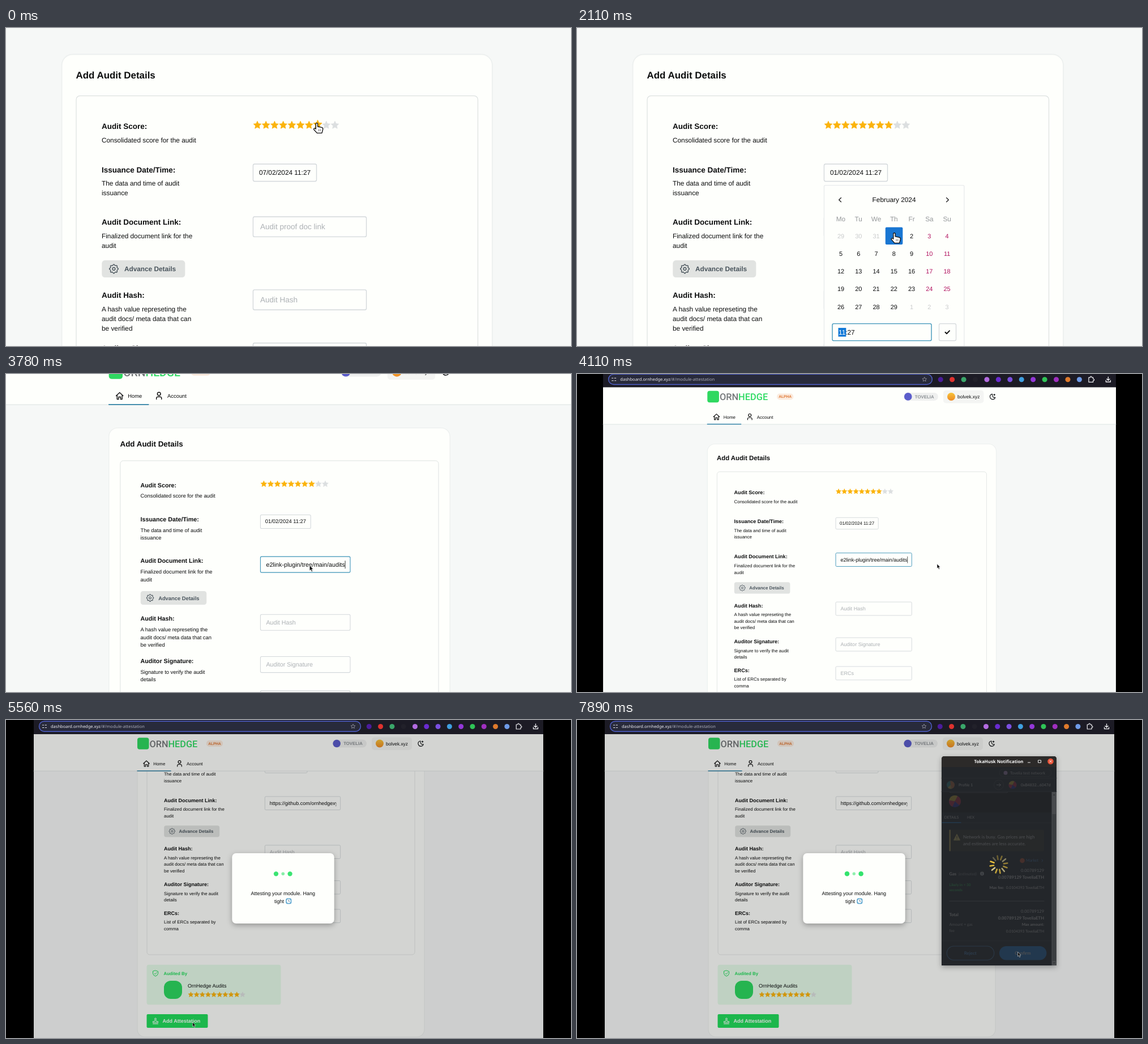
These frames come from a looping animation (998x561 px, 8 s). An HTML page:

```html
<!DOCTYPE html>
<html lang="en">
<head>
<meta charset="utf-8">
<title>Add Audit Details</title>
<style>
html, body { margin: 0; width: 100%; height: 100%; overflow: hidden; background: #000; }
svg { display: block; width: 100%; height: 100%; font-family: "Liberation Sans", Arial, sans-serif; text-rendering: geometricPrecision; }
text { white-space: pre; }
.lato { font-family: Lato, sans-serif; }
.noto { font-family: "Noto Sans", sans-serif; }
.brand { font-family: Roboto, sans-serif; }
.lift { filter: drop-shadow(0 3px 5px rgba(0,0,0,.3)); }
</style>
</head>
<body>
<svg id="stage" viewBox="0 0 998 561"></svg>
<script>
const LOOP = 8000;
const PAPER = '#fefffc', INK = '#0c0d0e', GREEN = '#22dc5b', GOLD = '#fbb30c', FOCUS = '#3b93b8', LINE = '#d3d8db';
const SMALL = 7.89, NORMAL = 9.01;

const rect = (x, y, w, h, r, fill, extra = '') =>
  `<rect x="${x}" y="${y}" width="${w}" height="${h}" rx="${r}" fill="${fill}" ${extra}/>`;
const circle = (x, y, r, fill, extra = '') => `<circle cx="${x}" cy="${y}" r="${r}" fill="${fill}" ${extra}/>`;
const text = (x, y, str, size = SMALL, fill = INK, extra = '') =>
  `<text x="${x}" y="${y}" font-size="${size}" fill="${fill}" ${extra}>${str}</text>`;
const stroke = (d, color, width = 1, extra = '') =>
  `<path d="${d}" fill="none" stroke="${color}" stroke-width="${width}" stroke-linecap="round" stroke-linejoin="round" ${extra}/>`;
const group = (id, content, extra = '') => `<g id="${id}" ${extra}>${content}</g>`;
const range = (n, fn) => Array.from({ length: n }, (_, i) => fn(i)).join('');
const BOLD = 'font-weight="700"', MID = 'text-anchor="middle"', END = 'text-anchor="end"';

function star(x, y, r, fill, id = '') {
  const pts = Array.from({ length: 10 }, (_, i) => {
    const a = i * Math.PI / 5 - Math.PI / 2, q = i % 2 ? r * .48 : r;
    return `${(q * Math.cos(a)).toFixed(2)},${(q * Math.sin(a)).toFixed(2)}`;
  });
  return `<polygon ${id && `id="${id}"`} transform="translate(${x} ${y})" points="${pts.join(' ')}" fill="${fill}" stroke="${fill}" stroke-width=".5" stroke-linejoin="round"/>`;
}
const stars = (x, y, filled, id = '') =>
  range(10, i => star(x + 10.15 * i, y, 4.8, i < filled ? GOLD : '#dcdfe0', i === 7 ? id : ''));

function pie(x, y, r, base, ...slices) {
  const pt = a => `${x + r * Math.cos(a)} ${y + r * Math.sin(a)}`;
  return circle(x, y, r, base) + slices.map(([from, to, fill]) =>
    `<path d="M${x} ${y}L${pt(from)}A${r} ${r} 0 0 1 ${pt(to)}Z" fill="${fill}"/>`).join('');
}
const blockie = (x, y, r) => pie(x, y, r, '#2b2fb0', [3.3, 5.2, '#f3c62b'], [5.2, 7, '#d8203c'], [2, 3.3, '#e0284a']);

function gear(x, y, color) {
  const pts = Array.from({ length: 32 }, (_, i) => {
    const a = (i - .5) * Math.PI / 16, r = i % 4 < 2 ? 5.2 : 4.2;
    return `${(x + r * Math.cos(a)).toFixed(2)} ${(y + r * Math.sin(a)).toFixed(2)}`;
  });
  return stroke(`M${pts.join('L')}Z`, color, .9) + circle(x, y, 1.6, 'none', `stroke="${color}" stroke-width=".9"`);
}

const lines = (x, y, list, gap = 11.4) => list.map((s, i) => text(x, y + gap * i, s)).join('');
const label = (y, title, ...desc) => text(279, y, title, NORMAL, INK, BOLD) + lines(279, y + 15.7, desc);
const box = (y, id = '') => rect(457.3, y, 133.4, 23.6, 1.8, PAPER, `stroke="${LINE}" stroke-width=".9" ${id && `id="${id}"`}`);
const hint = (y, str, id = 'none') => text(465.7, y + 14.8, str, NORMAL, '#adb1b5', id === 'none' ? '' : `id="${id}"`);

const docUrl = 'https://github.com/ornhedgexyz/safe-e2link-plugin/tree/main/audits';

const form =
  rect(232, 124.5, 507, 615, 13, PAPER, 'stroke="#edf0ef" stroke-width="1.2"') +
  text(248.7, 152.5, 'Add Audit Details', 11.27, INK, BOLD) +
  rect(249, 173.2, 473, 421.3, 4.5, 'none', 'stroke="#dde1e0" stroke-width=".8"') +
  label(212.4, 'Audit Score:', 'Consolidated score for the audit') +
  label(263.2, 'Issuance Date/Time:', 'The data and time of audit', 'issuance') +
  label(325, 'Audit Document Link:', 'Finalized document link for the', 'audit') +
  label(410.8, 'Audit Hash:', 'A hash value represeting the', 'audit docs/ meta data that can', 'be verified') +
  label(473.6, 'Auditor Signature:', 'Signature to verify the audit', 'details') +
  label(524.1, 'ERCs:', 'List of ERCs separated by', 'comma') +
  stars(462.3, 207.8, 8, 'hotStar') +
  rect(457.3, 253.5, 74.7, 20.3, 1.8, PAPER, `id="dateBox" stroke="${LINE}" stroke-width=".9"`) +
  text(464.3, 266, '', SMALL, INK, 'id="dateText"') +
  box(315.5, 'docBox') + hint(315.5, 'Audit proof doc link', 'docHint') +
  `<g clip-path="url(#docClip)">${text(465.7, 330.3, docUrl, NORMAL, INK, 'id="docText"')}</g>` +
  stroke('M583.2 322V333', INK, .7, 'id="caret"') +
  rect(279.2, 366.7, 98, 20.2, 3.6, '#e1e3e1') + gear(293.3, 376.8, '#48535b') +
  text(305.6, 379.8, 'Advance Details', SMALL, '#4a555d', BOLD) +
  box(401.4) + hint(401.4, 'Audit Hash') +
  box(464) + hint(464, 'Auditor Signature') +
  box(514.5) + hint(514.5, 'ERCs') +
  rect(248.5, 612.3, 237, 70.5, 4, '#e5fbe9') +
  stroke('M264 622.5L268.5 624V628Q268 631 264 632.5Q260 631 259.5 628V624ZM262 627.5L263.5 629L266.3 626', GREEN, 1) +
  text(278.5, 630.3, 'Audited By', SMALL, GREEN, BOLD) +
  rect(279, 640.5, 32, 32, 12, '#2cd860') +
  text(321, 652.8, 'OrnHedge Audits', NORMAL) + stars(326.5, 665, 9) +
  rect(248.5, 699.5, 108, 24, 2, GREEN) +
  stroke('M259.5 716.5H268.5M259.5 714V712.3H262.6L263.2 709.5Q261.6 706.5 264 706.3Q266.4 706.5 264.8 709.5L265.4 712.3H268.5V714Z', '#fff', 1) +
  text(276.5, 714.8, 'Add Attestation', NORMAL, '#fff', BOLD);

function dayCell(i) {
  const col = i % 7, row = Math.floor(i / 7), day = i - 2;
  const inMonth = day >= 1 && day <= 29;
  const shown = day < 1 ? day + 31 : day > 29 ? day - 29 : day;
  const fill = !inMonth ? '#c9cbcc' : col > 4 ? '#b1125f' : INK;
  return text(477 + 20.85 * col, 340.5 + 20.85 * row, shown, 7.32, fill, `${MID} ${inMonth ? `id="day${day}"` : ''}`);
}
const calendar =
  rect(457.3, 278.5, 165, 193, 1.5, PAPER, 'stroke="#e6e9ea" stroke-width=".8"') +
  stroke('M477.3 293.2L474.8 295.6L477.3 298M601.4 293.2L603.9 295.6L601.4 298', '#222', .9) +
  text(539.7, 298.3, 'February 2024', SMALL, INK, MID) +
  ['Mo', 'Tu', 'We', 'Th', 'Fr', 'Sa', 'Su'].map((d, i) => text(477 + 20.85 * i, 320.8, d, SMALL, '#96999b', MID)).join('') +
  rect(0, 0, 20.4, 20.4, 1.4, '#1976d2', 'id="picked"') +
  range(35, dayCell) +
  rect(467, 441.2, 116.7, 20, 1.6, PAPER, `stroke="${FOCUS}" stroke-width=".9"`) +
  rect(474, 446.2, 9.2, 10.3, 0, '#1279d8') +
  text(474.3, 454.2, '<tspan fill="#fff">11</tspan>:27') +
  rect(592.7, 441.2, 20, 20, 1.6, PAPER, `stroke="${LINE}" stroke-width=".8"`) +
  stroke('M600 451.3L601.7 453L605 449.6', '#111', 1.3);

const extensionColors = ['#4b1c9c', '#e0322f', '#3aa66a', '#22212a', '#b36be0', '#6a2bd0', '#7b4fe0', '#3f9fe0',
  '#9337d8', '#2fc457', '#a02fc0', '#e07a2c', '#6f9be8'];
const browser =
  rect(49, 0, 900, 25, 0, '#1c1b25') +
  rect(58.5, 2.2, 568, 18, 9, '#282a3b', 'stroke="#5060cc" stroke-width="1.4"') +
  stroke('M64.5 9H66.5M69 9H71.5M64.5 13.5H67M69.5 13.5H71.5', '#e8e8ee', 1.1) +
  text(79, 14, 'dashboard.ornhedge.xyz<tspan fill="#a9abb8">/#/module-attestation</tspan>', 7.5, '#eeeef4', 'class="noto"') +
  `<g fill-opacity="0">${star(613, 11.3, 4, '#dcdce4')}</g>` +
  extensionColors.map((c, i) => circle(641.3 + 20.3 * i, 11.5, 4.5, c)).join('') +
  group('badge', rect(864, 11.5, 7.4, 8, 1.2, '#2f7de0') + text(867.7, 18, '1', 6.5, '#fff', MID)) +
  stroke('M901.3 8H904Q904 6 905.3 6Q906.6 6 906.6 8H909V10.5Q911 10.6 911 12Q911 13.3 909 13.4V16H901.3Z', '#f0f0f4', 1.2) +
  stroke('M935.5 7V12.5M933 10.5L935.5 13L938 10.5M931.5 13V15.7H939.5V13', '#f0f0f4', 1.3);

const header =
  rect(49, 25, 900, 65, 0, PAPER) +
  stroke('M49 90H949', '#d9e0df', .8) + stroke('M232 89.8H291', '#3182a6', 1.4) +
  rect(232, 31.3, 20.5, 20.5, 4, '#2fd860') +
  text(253.5, 47.8, 'ORN<tspan fill="#2edb63">HEDGE</tspan>', 16.3, '#74787a', 'class="brand" font-weight="500"') +
  rect(354, 36, 29, 11, 5, '#fbebde') + text(368.5, 44, 'ALPHA', 6.6, '#df7733', `${BOLD} ${MID}`) +
  rect(577, 34.5, 60, 14, 7, '#eff0ef') + circle(584.2, 41.5, 6.8, '#5b5dcb') +
  text(613, 44.3, 'TOVELIA', 7.8, '#8b9094', `${BOLD} ${MID}`) +
  rect(646, 30.5, 71, 22.5, 5, '#f4f5f3') + circle(660, 41.5, 7, 'url(#sun)') +
  text(671, 44.5, 'bolvek.xyz', 8.35) +
  stroke('M732 37Q727.5 38 728 42Q729 46.5 733 46.3Q736.5 46 737.2 42.8Q731.5 44 732 37ZM735.6 37V39.5M734.3 38.2H736.9', '#15181a', 1.2) +
  stroke('M242.8 76.8L248 72L253.2 76.8M244.3 76V82H246.5V78.5H249.5V82H251.7V76', '#111', 1.2) +
  text(260.3, 80, 'Home') +
  circle(306.5, 74, 2.4, 'none', 'stroke="#111" stroke-width="1.2"') + stroke('M302.7 82V80Q303 78.3 305 78.3H308Q310 78.3 310.3 80V82', '#111', 1.2) +
  text(319, 80, 'Account');

const modal =
  `<g class="lift">${rect(399.3, 235, 180.4, 124, 7, PAPER)}</g>` +
  range(3, i => circle(477 + 12.3 * i, 271.3, 4, '#2ee269', `id="dot${i}"`)) +
  text(489.3, 308.7, 'Attesting your module. Hang', NORMAL, INK, MID) +
  text(474, 322.8, 'tight', NORMAL) +
  rect(494.3, 314.6, 10, 10, 3, '#5aa5cf') + circle(499.3, 319.4, 3.6, '#eef6fa') + stroke('M499.3 317.3V319.5L500.8 320.4', '#456', .7);

const fee = (y, str, size, extra = '') => text(825, y, str, size, '#fff', `${END} ${extra}`);
const popupContent =
  rect(644, 100, 194, 63, 0, '#141618') +
  rect(657, 100, 105, 28, 3, 'none', 'stroke="#6a6f74" stroke-width=".8"') +
  blockie(667.5, 143.5, 10.5) +
  text(661.5, 174.3, 'DETAILS', 6.6, '#fff', MID) + text(695.5, 174.3, 'HEX', 6.6, '#e4e6e8', MID) +
  stroke('M644 181.5H838', '#3b4046', .8) + stroke('M645 181H678', '#1f8df5', 1.4) +
  rect(657.5, 193.5, 167.5, 38, 2, '#3a382e') + rect(657.5, 193.5, 2.4, 38, 1, '#f3d568') +
  `<path d="M671 201.5L676.5 212H665.5Z" fill="#f6dc70" stroke="#f6dc70" stroke-linejoin="round"/>` +
  stroke('M671 205V208.3M671 210.3V210.4', '#3a382e', 1.1) +
  text(682, 209, 'Network is busy. Gas prices are high', 8, '#fff') + text(682, 221.3, 'and estimates are less accurate.', 8, '#fff') +
  circle(786.5, 248, 4.3, '#dc5b32') + text(793, 250.3, 'Market', 7, '#4b8fe2') + stroke('M821 246L822.8 248L821 250', '#4b8fe2', .8) +
  text(657.5, 274, 'Gas', 7.5, '#fff', BOLD) + text(674, 273.7, '(estimated)', 7, '#8d949b', 'font-style="italic"') +
  circle(715.5, 271, 3.4, '#c9cdd1') + stroke('M715.5 270.8V272.7M715.5 269.2V269.3', '#24272a', .9) +
  fee(268.3, '0.00789129', 7.5) + fee(280.4, '0.00789129 ToveliaETH', 7.6, BOLD) +
  text(657.5, 293, 'Likely in &lt; 30', 6.5, '#28c95a', BOLD) + text(657.5, 302, 'seconds', 6.5, '#28c95a', BOLD) +
  fee(298, '<tspan font-weight="700">Max fee:</tspan>  0.0104393 ToveliaETH', 6.7) +
  stroke('M657.5 319.5H825', '#83888d', .8) +
  text(657.5, 345.7, 'Total', 7.5, '#fff', BOLD) +
  fee(339.6, '0.00789129', 7.5) + fee(352, '0.00789129 ToveliaETH', 7.6, BOLD) +
  text(657.5, 363.3, 'Amount + gas', 6.8, '#c6cacf') + text(657.5, 374.3, 'fee', 6.8, '#c6cacf') +
  fee(363.3, 'Max amount:', 6.7, BOLD) + fee(374.5, '0.0104393 ToveliaETH', 6.7) +
  stroke('M644 389.5H838', '#3b4046', .8) +
  rect(653.3, 399, 83.4, 24.5, 12.2, 'none', 'stroke="#4a8ccc" stroke-width="1.1"') + text(694.8, 413.6, 'Reject', 7.9, '#4c9bea', `${BOLD} ${MID}`) +
  rect(746, 399, 83.4, 24.5, 12.2, '#1a8df5') + text(787.5, 413.6, 'Confirm', 7.9, '#fff', `${BOLD} ${MID}`);

const popup =
  `<g class="lift"><path d="M644 433V69Q644 64 649 64H842Q847 64 847 69V433Z" fill="#24272a"/></g>` +
  `<path d="M644 83V69Q644 64 649 64H842Q847 64 847 69V83Z" fill="#2c2a29"/>` +
  text(745, 76.4, 'TokaHusk Notification', 7.8, '#fff', `class="noto" ${BOLD} ${MID}`) +
  stroke('M796.5 75H800.5M815 71H819.5V75.3H815Z', '#eee', 1) + circle(836.5, 73, 5.3, '#e9553a') + stroke('M834.7 71.2L838.3 74.8M838.3 71.2L834.7 74.8', '#fff', .9) +
  rect(746, 86.7, 92, 13, 6.5, 'none', 'stroke="#44494f" stroke-width=".8"') + circle(757, 93.2, 3.5, '#cfa0e2') +
  text(765, 95.7, 'Tovelia test network', 7, '#d6d9dc') + stroke('M644 102.5H847M644 126.5H847', '#3b4046', .8) +
  pie(660, 114.5, 7, '#2b9a9a', [4.6, 7.6, '#d8743c'], [1.3, 2.4, '#d8b04a']) + text(674, 117, 'Profile 1', 6.9, '#fff') +
  circle(745, 114.5, 8.5, '#24272a', 'stroke="#4b5157" stroke-width=".8"') + stroke('M741.5 114.5H748.5M745.7 111.8L748.5 114.5L745.7 117.2', '#b9bec3', .9) +
  blockie(769.5, 114.5, 7) + text(784, 117, '0xB4832...6047d', 6.9, '#fff') +
  `<g clip-path="url(#popupClip)">${group('popupBody', popupContent)}</g>` +
  rect(838.5, 127, 8.5, 306, 0, '#f2f2f2') + rect(839.5, 166, 6.5, 259, 0, '#a3a5a7', 'id="thumb"') +
  '<path d="M840.8 133L842.7 130.7L844.6 133ZM840.8 427.7L842.7 430L844.6 427.7Z" fill="#555"/>' +
  group('loading', rect(644, 83, 203, 350, 0, '#24272a', 'opacity=".82"') +
    group('spinner', range(12, i => stroke('M0 -9V-15.5', i % 3 ? '#f0c63f' : '#f3e3a0', 2.6, `transform="rotate(${i * 30})" opacity="${.3 + i * .06}"`))));

const cursors =
  group('hand', '<path d="M-1.1 .3Q0 -.8 1.1 .3V4L5.8 4.9Q7.4 5.3 7.2 7L6.6 9.5L6 11.6H.3L-3.5 7.3Q-3.7 5.7 -2.2 6L-1.1 6.8Z" fill="#fff" stroke="#111" stroke-width=".9" stroke-linejoin="round"/>' + stroke('M2.4 7.2V9.3M4.2 7.2V9.3', '#333', .5)) +
  group('beam', stroke('M-1.7 -4.2Q0 -4.2 0 -3.4Q0 -4.2 1.7 -4.2M0 -3.4V3.6M-1.7 4.4Q0 4.4 0 3.6Q0 4.4 1.7 4.4', '#fff', 2, 'opacity=".6"') +
    stroke('M-1.7 -4.2Q0 -4.2 0 -3.4Q0 -4.2 1.7 -4.2M0 -3.4V3.6M-1.7 4.4Q0 4.4 0 3.6Q0 4.4 1.7 4.4', '#111', .9)) +
  group('arrow', '<path d="M0 0V8L1.8 6.4L3.1 9.4L4.5 8.8L3.2 5.9H5.6Z" fill="#111" stroke="#fff" stroke-width=".5"/>');

document.getElementById('stage').innerHTML =
  `<defs>
    <clipPath id="docClip"><rect x="465.4" y="316" width="118" height="23"/></clipPath>
    <clipPath id="popupClip"><rect x="644" y="127" width="194.5" height="306"/></clipPath>
    <clipPath id="pageClip"><rect x="49" y="90" width="900" height="471"/></clipPath>
    <linearGradient id="sun" x2="0" y2="1"><stop stop-color="#f8c53a"/><stop offset="1" stop-color="#ee8a26"/></linearGradient>
  </defs>` +
  rect(0, 0, 998, 561, 0, '#000') +
  group('scene',
    rect(49, 25, 900, 536, 0, '#f6f8f7') +
    `<g clip-path="url(#pageClip)">${group('page', form + group('calendar', calendar))}</g>` +
    header + browser +
    group('dialog', rect(49, 25, 900, 536, 0, '#000', 'opacity=".17"') + modal) +
    group('popup', popup, 'class="lato"') +
    group('cursor', cursors));

const el = {};
document.querySelectorAll('[id]').forEach(node => { el[node.id] = node; });
const set = (id, name, value) => el[id].setAttribute(name, value);
const show = (id, on) => set(id, 'visibility', on ? 'inherit' : 'hidden');

const progress = (t, from, to) => Math.min(1, Math.max(0, (t - from) / (to - from)));
const ease = p => (1 - Math.cos(Math.PI * p)) / 2;
const between = (t, from, to) => t >= from && t < to;

// Departure time, arrival time, position
const path = [
  [0, 0, 532.3, 205.5], [150, 560, 501, 263], [900, 1500, 540.5, 336], [1780, 1890, 540, 334.8],
  [2110, 2780, 602, 450], [2950, 3110, 508.4, 327.2], [3680, 4050, 635.1, 334.6],
  [4500, 4990, 329.5, 533], [5560, 6250, 747, 388], [6420, 6880, 778.5, 409],
];
const cursorKinds = [[0, 'hand'], [420, 'beam'], [1080, 'hand'], [3050, 'beam'], [3780, 'arrow'], [6200, 'beam'], [6520, 'arrow']];

function drawCursor(t) {
  let [, , x, y] = path[0];
  for (const [from, to, nx, ny] of path.slice(1)) {
    const p = ease(progress(t, from, to));
    x += (nx - x) * p;
    y += (ny - y) * p;
  }
  const kind = cursorKinds.filter(([at]) => at <= t).pop()[1];
  for (const id of ['hand', 'beam', 'arrow']) show(id, id === kind);
  set('cursor', 'transform', `translate(${x} ${y})`);
}

function drawForm(t) {
  const chosen = t >= 2060, pasted = t >= 3640, docFocus = between(t, 3480, 5200);
  set('hotStar', 'transform', `translate(533.35 ${t < 230 ? 207 : 207.8}) scale(${t < 230 ? 1.1 : 1})`);
  el.dateText.textContent = `${chosen ? '01' : '07'}/02/2024 11:27`;
  set('dateBox', 'stroke', between(t, 3000, 3480) || between(t, 620, 700) ? FOCUS : LINE);
  set('docBox', 'stroke', docFocus ? FOCUS : LINE);
  show('docHint', !pasted);
  show('docText', pasted);
  set('docText', 'text-anchor', docFocus ? 'end' : 'start');
  set('docText', 'x', docFocus ? 582.8 : 465.7);
  show('caret', docFocus && pasted && (t - 3640) % 1060 < 530);

  show('calendar', between(t, 700, 3000));
  set('picked', 'x', (chosen ? 539.7 : 518.7) - 10.2);
  set('picked', 'y', (chosen ? 338 : 358.85) - 10.2);
  set('day1', 'fill', chosen ? '#fff' : INK);
  set('day7', 'fill', chosen ? INK : '#fff');
  set('page', 'transform', `translate(0 ${-180.5 * ease(progress(t, 4500, 4990))})`);
}

function drawDialogs(t) {
  set('dialog', 'opacity', progress(t, 5400, 5560));
  const wave = Math.abs(((t - 6310 + 8000) / 400) % 2 - 1);
  for (let i = 0; i < 3; i++) {
    const k = i === 1 ? 1 - wave : wave;
    set('dot' + i, 'r', 2.6 + 1.75 * k);
    set('dot' + i, 'opacity', .5 + .5 * k);
  }
  show('popup', t >= 5880);
  show('badge', between(t, 5830, 7400));
  const scrolled = ease(progress(t, 6080, 6300));
  set('popupBody', 'transform', `translate(0 ${34 * (1 - scrolled)})`);
  set('thumb', 'y', 137 + 29 * scrolled);
  show('loading', t >= 7100);
  set('spinner', 'transform', `translate(745 255) rotate(${t * .36})`);
}

function draw(t) {
  const zoom = 1.5 - .5 * ease(progress(t, 3232, 4180));
  set('scene', 'transform', `translate(499 280.5) scale(${zoom}) translate(-499 -280.5)`);
  drawForm(t);
  drawDialogs(t);
  drawCursor(t);
}

const start = performance.now();
function tick() {
  draw((performance.now() - start) % LOOP);
  requestAnimationFrame(tick);
}
tick();
</script>
</body>
</html>
```
